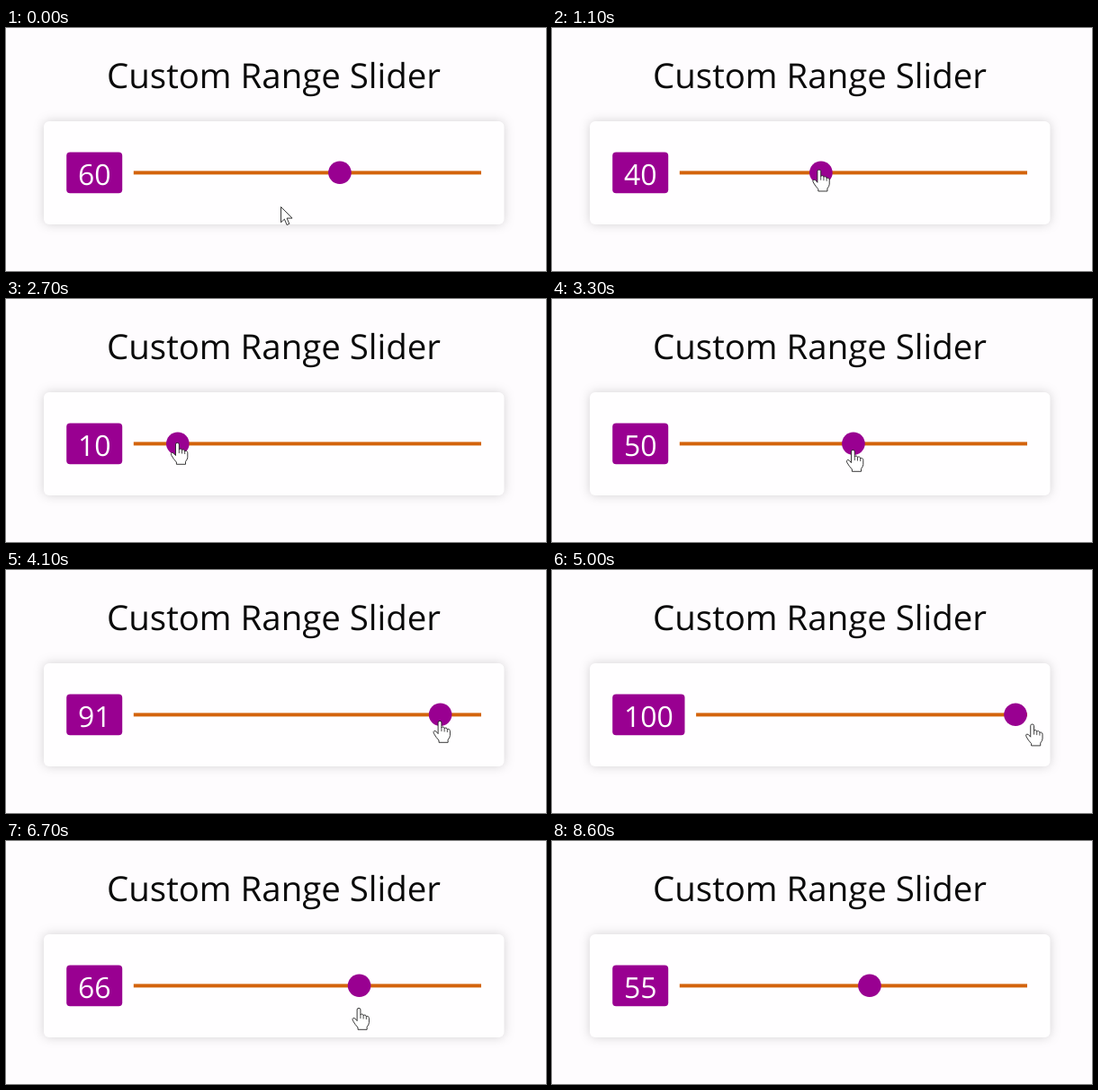
An HTML page that plays this animation: 600x271 px, repeating every 8.7 s.

```html
<!DOCTYPE html>
<html lang="en">
<head>
<meta charset="utf-8">
<title>Custom Range Slider</title>
<style>
  html, body { margin: 0; width: 100%; height: 100%; overflow: hidden; background: #fefcfe; }
  svg { display: block; width: 100vw; height: 100vh; }
  text { font-family: "Open Sans", "Noto Sans", sans-serif; text-anchor: middle; text-rendering: geometricPrecision; }
  .card { fill: #fffeff; filter: drop-shadow(0 0 6px rgba(0, 0, 0, .17)); }
  .accent { fill: #990091; }
  .cursor path { fill: #fff; stroke: #222; stroke-width: .9; stroke-linejoin: round; }
  .cursor .line { fill: none; stroke-width: .8; }
</style>
</head>
<body>
<svg viewBox="0 0 600 271">
  <rect width="600" height="271" fill="#fefcfe"/>
  <text x="297.5" y="66.8" font-size="38.4" fill="#0a0a0a">Custom Range Slider</text>
  <rect class="card" x="42" y="104" width="511.5" height="115" rx="6"/>
  <rect id="badge" class="accent" x="67.2" y="138.6" height="45.6" rx="4"/>
  <text id="label" y="174.7" font-size="32" fill="#fff"></text>
  <rect id="track" y="159.4" height="4" fill="#d3640c"/>
  <circle id="thumb" class="accent" cy="161.3" r="12.8"/>
  <g id="arrow" class="cursor">
    <path d="M.5.5V17.8L4.4 14.2 7.1 20.6 9.8 19.4 7.1 13.1H13Z"/>
  </g>
  <g id="hand" class="cursor">
    <path d="M-2.5 2Q-2.5.4-.6.4T1.3 2V8Q1.7 6.8 3.1 7T4.5 8.8Q5.2 7.7 6.4 8T7.7 10Q8.4 9 9.6 9.6T10.8 11.6V16.5Q10.6 19 8.5 21.3V24.3H-1.6V22Q-5 18.5-7.2 14.3-8.2 12.1-6.7 11.4-5.1 10.8-2.5 14.6Z"/>
    <path class="line" d="M1.3 8V12M4.5 8.8V12.5M7.7 10V13"/>
  </g>
</svg>
<script>
const LOOP = 8700, STEP = 100, END = 528, R = 13;
const OVER = 400, GRAB = 700, RELEASE = 7900;
const $ = id => document.getElementById(id);
const [badge, label, track, thumb, arrow, hand] =
  ["badge", "label", "track", "thumb", "arrow", "hand"].map($);

// Turning points of the drag: time, slider position (may overshoot 0..100), pointer y
const drag = [
  [GRAB, 60, 164], [1800, -8, 143], [2700, 10, 160], [3300, 50, 168],
  [4100, 91, 168], [4700, 109, 172], [5400, 97, 171], [5800, 92, 172],
  [6700, 66, 186], [7200, 31, 158], [RELEASE, 28, 97]
];

const clamp = (v, lo, hi) => Math.min(hi, Math.max(lo, v));
const mix = (a, b, k) => a + (b - a) * k;
const ease = k => (k = clamp(k, 0, 1), k * k * (3 - 2 * k));
const pointerX = pos => 155 + 3.6 * pos;

// Smooth curve through the keys that never overshoots them
function curve(keys, col, t) {
  const slope = i => i < 0 || i > keys.length - 2 ? 0 :
    (keys[i + 1][col] - keys[i][col]) / (keys[i + 1][0] - keys[i][0]);
  const tangent = i => {
    const a = slope(i - 1), b = slope(i);
    return a * b > 0 ? 2 * a * b / (a + b) : 0;
  };
  let i = 0;
  while (i < keys.length - 2 && keys[i + 1][0] < t) i++;
  const a = keys[i], b = keys[i + 1], h = b[0] - a[0];
  const s = clamp((t - a[0]) / h, 0, 1);
  return mix(a[col], b[col], ease(s)) +
    h * s * (1 - s) * ((1 - s) * tangent(i) - s * tangent(i + 1));
}

function set(el, attrs) {
  for (const name in attrs) el.setAttribute(name, attrs[name]);
}

function draw(t) {
  const pos = curve(drag, 1, t), reach = ease(t / GRAB);
  const value = Math.round(mix(clamp(pos, 0, 100), 55, ease((t - RELEASE - 100) / 600)));
  const text = String(value);
  const width = 25.4 + 18.3 * text.length;
  const left = 67.2 + width + 12.6;
  set(badge, { width });
  set(label, { x: 67.2 + width / 2 });
  label.textContent = text;
  set(track, { x: left, width: END - left });
  set(thumb, { cx: left + R + (END - left - 2 * R) * value / 100 });

  const x = mix(305, pointerX(pos), reach);
  const y = mix(199, curve(drag, 2, t), reach);
  const transform = `translate(${x} ${y})`;
  set(arrow, { transform, visibility: t < OVER ? "visible" : "hidden" });
  set(hand, { transform, visibility: t >= OVER && t <= RELEASE ? "visible" : "hidden" });
}

const start = performance.now();
function tick() {
  const t = (performance.now() - start) % LOOP;
  draw(Math.floor(t / STEP) * STEP);
  requestAnimationFrame(tick);
}
draw(0);
requestAnimationFrame(tick);
</script>
</body>
</html>
```
